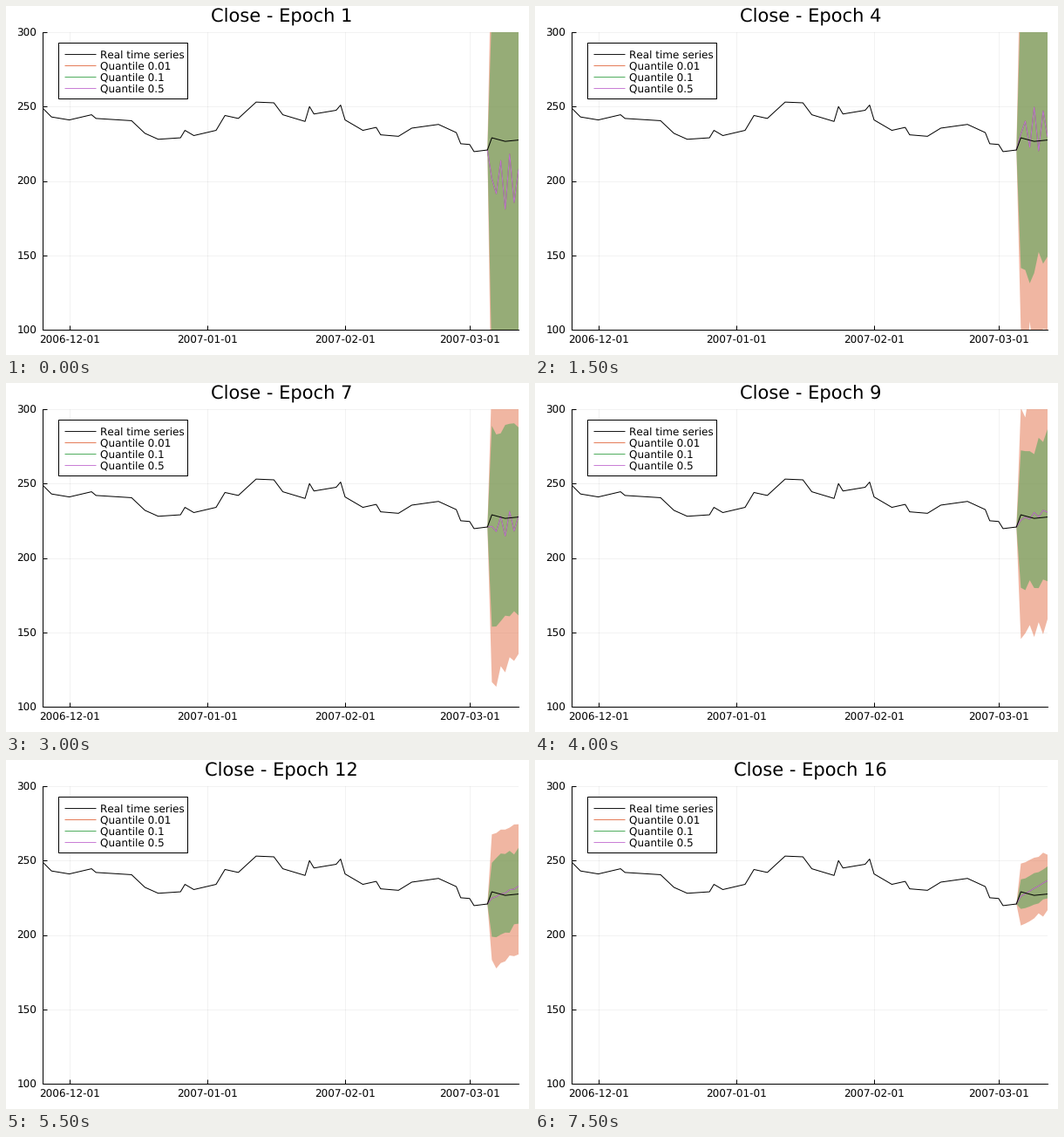
A matplotlib script that plays this animation: 600x400 px, repeating every 8 s.

```python
import numpy as np
import matplotlib.pyplot as plt
from matplotlib.animation import FuncAnimation
from matplotlib.patches import Polygon, Rectangle

W, H, DPI = 600, 400, 100
PX = 72 / DPI  # points per pixel
LEFT, RIGHT, TOP, BOTTOM = 42, 588, 30, 371
RED, GREEN, PURPLE = "#E36F47", "#3EA44E", "#C371D2"
MONTHS = {0: "2006-12-01", 31: "2007-01-01", 62: "2007-02-01", 90: "2007-03-01"}
LEVELS = range(100, 301, 50)
plt.rcParams.update({"font.family": "DejaVu Sans", "text.hinting": "none",
                     "text.hinting_factor": 1})

# Turning points of the price; x counts days from 1 December
TURNS = [
    (-6, 249), (-4, 243), (0, 241), (5, 244.5), (6, 242), (14, 240.5),
    (17, 232), (20, 228), (25, 229), (26, 234), (28, 230.5), (33, 234),
    (35, 244), (38, 242), (42, 253), (46, 252.5), (48, 244.5), (53, 240),
    (54, 250), (55, 245), (60, 247.5), (61, 251), (62, 241), (66, 234),
    (69, 236), (70, 231), (74, 230), (77, 235.5), (83, 238), (87, 232.5),
    (88, 225), (90, 224.5), (91, 219.7), (94, 220.8), (95, 229), (98, 226.6),
    (101, 227.5),
]
START = 220.8
STEP = np.arange(1, 8)
AHEAD = np.arange(94, 102)


def forecast(epoch):
    """Median path and the inner and outer band outlines for one epoch."""
    rng = np.random.default_rng(epoch)
    swing = np.cos(np.pi * (epoch - 1) / 3)
    level = 227.5 + 0.5 * (epoch - 9) - 24 * swing * np.exp(-(epoch - 1) / 3.3)
    ripple = 19 * swing * np.exp(-((epoch - 1) / 6.5) ** 2)
    zigzag = -np.cos(np.pi * STEP) * np.sin(np.pi * STEP / 9) ** 2
    median = level + 0.11 * epoch * (STEP - 4) + ripple * zigzag

    inner = 145 / (1 + np.exp((epoch - 6.2) / 3.8))
    outer = 1.5 * inner + 5

    def edge(offset):
        jitter = 0.06 * offset * rng.standard_normal(STEP.size)
        return np.r_[START, level + 1.3 * (STEP - 4) + offset + jitter]

    def outline(width):
        return np.r_[np.c_[AHEAD, edge(-width)], np.c_[AHEAD, edge(width)][::-1]]

    return np.r_[START, median], outline(inner), outline(outer)


fig = plt.figure(figsize=(W / DPI, H / DPI), dpi=DPI, facecolor="white")
ax = fig.add_axes([LEFT / W, 1 - BOTTOM / H, (RIGHT - LEFT) / W, (BOTTOM - TOP) / H])
ax.set(xlim=(-6, 101), ylim=(100, 300))
ax.set_xticks(list(MONTHS), [""] * len(MONTHS))
ax.set_yticks(LEVELS, [""] * len(LEVELS))
ax.tick_params(direction="in", length=5 * PX, width=PX)
ax.set_axisbelow(True)
ax.grid(color="black", alpha=0.1, linewidth=0.5 * PX)
for side in ("top", "right"):
    ax.spines[side].set_visible(False)
for side in ("left", "bottom"):
    ax.spines[side].set_linewidth(PX)

# Overlay in pixel units for text and legend
page = fig.add_axes([0, 0, 1, 1], zorder=2)
page.set(xlim=(0, W), ylim=(H, 0))
page.axis("off")


def label(x, y, text, size=11.8, ha="left"):
    return page.text(x, y, text, fontsize=size * PX, ha=ha, va="baseline")


for day, text in MONTHS.items():
    label(LEFT + 0.5 + (day + 6) * (RIGHT - LEFT) / 107, 387.3, text, ha="center")
for value in LEVELS:
    y = BOTTOM - (value - 100) * (BOTTOM - TOP) / 200
    label(35.3, y + 4.6, str(value), ha="right")

page.add_patch(Rectangle((60, 42), 148, 64, fc="white", ec="black", lw=PX))
legend = [("Real time series", "black"), ("Quantile 0.01", RED),
          ("Quantile 0.1", GREEN), ("Quantile 0.5", PURPLE)]
for row, (text, color) in enumerate(legend):
    y = 55 + 13 * row
    page.plot([67, 103], [y, y], color=color, lw=0.9 * PX, solid_capstyle="butt")
    label(108.3, y + 4.8, text)

title = label(316, 18.5, "", size=20.8, ha="center")


def band(color, z):
    return ax.add_patch(Polygon([(94, START)] * 3, fc=color, alpha=0.5, lw=0, zorder=z))


outer_band, inner_band = band(RED, 2), band(GREEN, 3)
medians = [ax.plot([], [], color=c, lw=PX, zorder=4)[0] for c in (RED, GREEN, PURPLE)]
ax.plot(*zip(*TURNS), color="black", lw=PX, zorder=5)


def update(i):
    epoch = i + 1
    median, inner, outer = forecast(epoch)
    title.set_text(f"Close - Epoch {epoch}")
    inner_band.set_xy(inner)
    outer_band.set_xy(outer)
    for line in medians:
        line.set_data(AHEAD, median)
    return [title, outer_band, inner_band, *medians]


anim = FuncAnimation(fig, update, frames=16, interval=500, repeat=True,
                     repeat_delay=0, blit=False)
plt.show()
```
